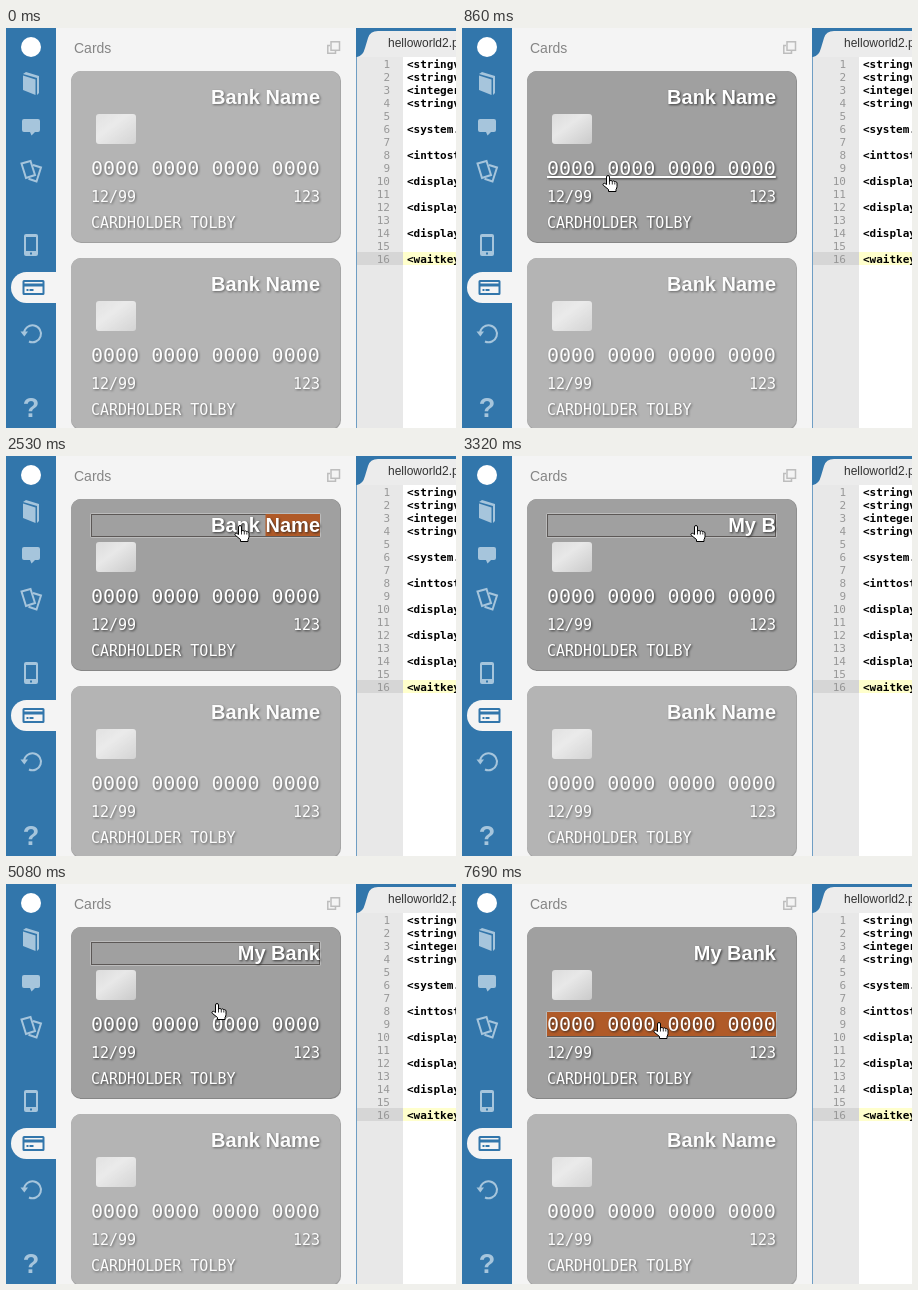
Write an HTML page that moves like this. It is 450x400 px and loops after 8000 ms.

```html
<!DOCTYPE html>
<html lang="en">
<head>
<meta charset="utf-8">
<title>Card editor</title>
<style>
  html, body { margin: 0; width: 100%; height: 100%; overflow: hidden; background: #fff; }
  svg { display: block; width: 450px; height: 400px; }
  text { white-space: pre; }
  .sans { font-family: "Liberation Sans", Arial, sans-serif; }
  .mono { font-family: "DejaVu Sans Mono", monospace; }
  .bank { font-weight: bold; font-size: 20px; text-anchor: end; }
  .big { font-size: 20px; }
  .small { font-size: 15px; }
  .card text { fill: #fff; filter: drop-shadow(1px 1px 1px rgba(30, 30, 30, .8)); }
  .card { opacity: .76; }
  .card.hover { opacity: 1; }
  .under { text-decoration: underline; }
  .code { font-size: 11px; }
  .icon { fill: #a6c5dc; }
  .line { fill: none; stroke: #a6c5dc; stroke-width: 2; }
</style>
</head>
<body>
<svg viewBox="0 0 450 400" xmlns="http://www.w3.org/2000/svg">
  <defs>
    <linearGradient id="chip" x1="0" y1="0" x2="1" y2="1">
      <stop offset="0" stop-color="#dcdcdc"/>
      <stop offset=".4" stop-color="#e8e8e8"/>
      <stop offset="1" stop-color="#cacaca"/>
    </linearGradient>
  </defs>

  <rect x="50" width="300" height="400" fill="#f4f4f4"/>
  <text class="sans" x="68" y="25" font-size="14" fill="#858585">Cards</text>
  <g fill="none" stroke="#bdbdbd" stroke-width="1.5">
    <path d="M324 17.5h-2.2v7.7h7.7v-2.4"/>
    <rect x="325" y="13.8" width="8.5" height="8.5"/>
  </g>
  <g id="cards"></g>

  <rect width="50" height="400" fill="#3276ab"/>
  <circle cx="25" cy="19" r="10" fill="#fff"/>
  <g class="icon">
    <path d="M17 46l3-2 13 4v17l-2 2V50z"/>
    <path d="M17 47.500l12.500 4V67L17 62z"/>
    <path d="M18 91h14q2 0 2 2v9q0 2-2 2h-3l-3.500 3.500-1.500-3.500h-6q-2 0-2-2v-9q0-2 2-2z"/>
    <path fill-rule="evenodd" d="M20 206h10q2 0 2 2v18q0 2-2 2H20q-2 0-2-2v-18q0-2 2-2zm0 3v14h10v-14zm4 15.500v2h2v-2z"/>
  </g>
  <g class="line" stroke-width="1.500">
    <path d="M15.500 135.500l9-2.500 4.500 14-9 3z"/>
    <path d="M27 137l8 2.500-4.500 14-8-2.800" fill="none"/>
  </g>
  <path d="M50 244H20.500a15.500 15.500 0 0 0 0 31H50z" fill="#f4f4f4"/>
  <path fill="#3276ab" fill-rule="evenodd" d="M18 252h19q1.500 0 1.500 1.500v12q0 1.500-1.500 1.500H18q-1.500 0-1.500-1.500v-12q0-1.500 1.500-1.500zm.5 2v1.500h18V254zm0 4.500v6.500h18v-6.500zm2 2.500h2v2h-2zm3 0h4v2h-4z"/>
  <path class="line" d="M18 305a8.500 8.500 0 1 1 5 8.500"/>
  <path class="icon" d="M14.500 303.500h7.500l-3.700 5z"/>
  <text class="sans icon" x="25" y="389" font-size="27" font-weight="bold" text-anchor="middle">?</text>

  <rect x="350" width="100" height="29" fill="#3276ab"/>
  <path d="M351 29q6-1 8-9l3-10q2-7 10-7h78v26z" fill="#ececec"/>
  <text class="sans" x="382" y="19" font-size="12" fill="#333">helloworld2.php</text>
  <rect x="351" y="29" width="99" height="371" fill="#fff"/>
  <rect x="351" y="29" width="46" height="371" fill="#e8e8e8"/>
  <rect x="350" y="29" width="1" height="371" fill="#3276ab" opacity=".7"/>
  <rect x="351" y="224" width="46" height="13" fill="#d6d6d6"/>
  <rect x="397" y="224" width="53" height="13" fill="#ffffcc"/>
  <g id="code" class="mono code"></g>

  <g id="cursor" visibility="hidden">
    <path d="M4.500 9.500V2a1.500 1.500 0 0 1 3 0v4.300q.2-.8 1.400-.8t1.400 1.100q.3-.8 1.300-.7t1.200 1.200q.4-.6 1.200-.4t1 1.300v3.500q0 1.500-1 3v2H6.500v-2L1.300 10.300q-.8-1.300.2-1.800t2 .3z"
      fill="#fff" stroke="#000" stroke-linejoin="round"/>
    <path d="M7.500 6v3.500M10.300 7v2.500M12.800 7.500v2" stroke="#000" stroke-width=".8"/>
  </g>
</svg>
<script>
const LOOP = 8000, STEP = 40;
const $ = id => document.getElementById(id);

const codeLines = ["<stringvar", "<stringvar", "<integervar", "<stringvar", "", "<system.cls", "",
  "<inttostring", "", "<display", "", "<display", "", "<display", "", "<waitkey"];
$("code").innerHTML = codeLines.map((line, i) => {
  const y = 40 + 13 * i;
  return `<text x="384" y="${y}" text-anchor="end" fill="#989898">${i + 1}</text>` +
    `<text x="401" y="${y}" font-weight="bold">${line.replace("<", "&lt;")}</text>`;
}).join("");

// Each field: hover box (x, y, width, height)
const fields = {
  bank: [85, 58, 229, 22],
  number: [85, 128, 229, 24],
  expiry: [85, 159, 46, 18],
  code: [287, 159, 27, 18],
  holder: [85, 185, 229, 18]
};

const card = (id, dy) => `<g class="card" id="${id}" transform="translate(0 ${dy})">
  <rect x="65" y="43" width="270" height="172" rx="10" fill="#868686"/>
  <rect x="65" y="43" width="269.300" height="171" rx="10" fill="#a0a0a0"/>
  <rect x="90" y="86" width="40" height="30" rx="3" fill="url(#chip)"/>
  <g class="focus"></g>
  <text class="sans bank" x="314" y="76">Bank Name</text>
  <text class="mono big number" x="85" y="147">0000 0000 0000 0000</text>
  <text class="mono small expiry" x="85" y="174">12/99</text>
  <text class="mono small code15 code" style="font-size:15px" x="314" y="174" text-anchor="end">123</text>
  <text class="mono small holder" x="85" y="200">CARDHOLDER TOLBY</text>
</g>`;
$("cards").innerHTML = card("top", 0) + card("next", 187);

const top1 = $("top"), focusLayer = top1.querySelector(".focus");
const labels = Object.fromEntries(Object.keys(fields).map(k => [k, top1.querySelector("." + k)]));

const lin = u => u;
const soft = u => .6 * u + .4 * u * u * (3 - 2 * u);
const out = p => u => 1 - (1 - u) ** p;

// start, end, x, y, easing of x, easing of y
const moves = [
  [500, 1300, 224, 74, soft, soft],
  [1340, 1460, 230, 69, lin, lin],
  [1630, 1630, 228, 69, lin, lin],
  [4640, 5440, 191, 137, out(1.11), out(1.57)],
  [5860, 5900, 191, 138, lin, lin]
];

function cursorAt(t) {
  let x = 64.3, y = 212.3;
  for (const [start, end, tx, ty, ex, ey] of moves) {
    if (t < start) break;
    const done = (Math.floor((t - start) / STEP) + 1) * STEP;
    const u = Math.min(1, done / (end - start + STEP));
    x += (tx - x) * ex(u);
    y += (ty - y) * ey(u);
  }
  return [Math.round(x), Math.round(y)];
}

// Last value whose time has come
const pick = (list, t) => list.reduce((v, [at, next]) => t >= at ? next : v, null);

const typed = [[0, "Bank Name"], [2860, "M"], [3070, "My"], [3200, "My "], [3320, "My B"],
  [3510, "My Ba"], [3620, "My Ban"], [3820, "My Bank"]];
const focused = [[1930, "bank"], [6080, "number"]];
const selectedFrom = [[2530, 259.5], [2570, 205], [2860, null],
  [7150, 266], [7330, 205], [7490, 145], [7690, 85]];

function focusMarkup(name, from) {
  if (!name) return "";
  const [x, y, w, h] = fields[name];
  const frame = (grow, style) =>
    `<rect x="${x + .5 - grow}" y="${y + .5 - grow}" width="${w - 1 + 2 * grow}" height="${h + 2 * grow}" fill="none" ${style}/>`;
  const mark = from === null ? "" :
    `<rect x="${from}" y="${y}" width="${x + w - from}" height="${h}" fill="#b05a28"/>`;
  return frame(1, 'rx="1" stroke="#c4c4c4" stroke-opacity=".8"') + frame(0, 'stroke="#5c5856"') + mark;
}

function draw(t) {
  const [x, y] = cursorAt(t);
  const shown = t >= 500, focus = pick(focused, t);
  const tipX = x + 6, tipY = y;
  $("cursor").setAttribute("visibility", shown ? "visible" : "hidden");
  $("cursor").setAttribute("transform", `translate(${x} ${y})`);
  top1.classList.toggle("hover", shown);
  labels.bank.textContent = pick(typed, t);
  focusLayer.innerHTML = focusMarkup(focus, pick(selectedFrom, t));
  for (const [name, [fx, fy, w, h]] of Object.entries(fields)) {
    const over = tipX >= fx && tipX < fx + w && tipY >= fy && tipY < fy + h;
    labels[name].classList.toggle("under", shown && over && name !== focus);
  }
}

const began = performance.now();
function tick() {
  draw((performance.now() - began) % LOOP);
  requestAnimationFrame(tick);
}
tick();
</script>
</body>
</html>
```
